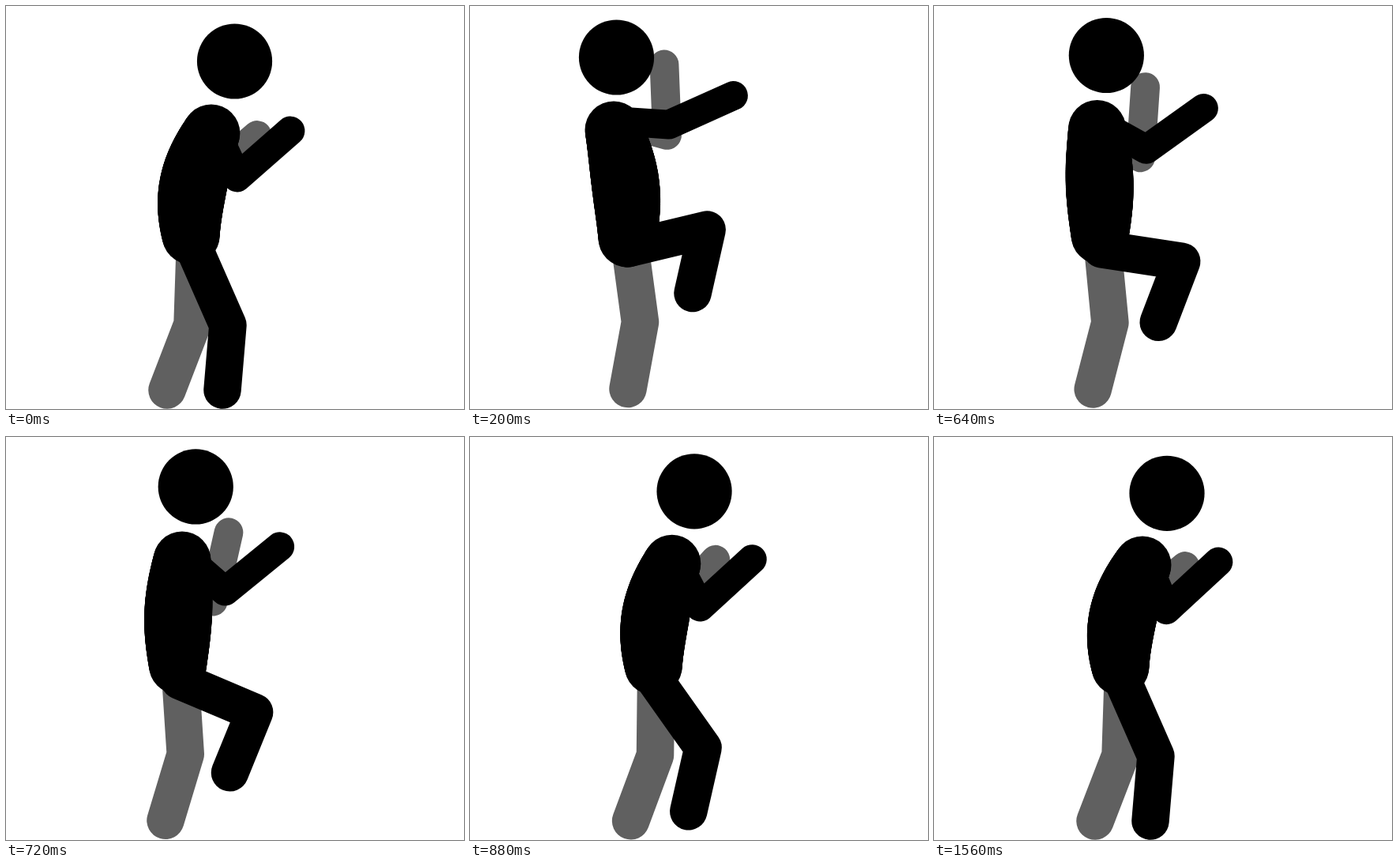
Recreate the animation shown at these times as an HTML page with a canvas. Size 580x510 px, loop 1.6 s.

```html
<!DOCTYPE html>
<html lang="en">
<head>
<meta charset="utf-8">
<title>Knee raise</title>
<style>
html, body { margin: 0; width: 100%; height: 100%; overflow: hidden; background: #fff; }
canvas { display: block; }
</style>
</head>
<body>
<canvas id="stage" width="580" height="510"></canvas>
<script>
const ctx = document.getElementById('stage').getContext('2d');
const LOOP = 1600, STEP = 40, RAISE = 200, LOWER_AT = 520, LOWER = 400;
const BLACK = '#000', GREY = '#606060';
const THIGH = 103, SHIN = 82.5, UPPER_ARM = 67, FOREARM = 89.5;
const LEG_WIDTH = 47.5, ARM_WIDTH = 36.8, HEAD_RADIUS = 47.6;

const mix = (a, b, q) => a + (b - a) * q;
const easeOut = (u, k) => u + k * u * (1 - u);

// Point on the way from a (rest) to b (raised); bow bends the path halfway.
function travel(a, b, q, bow = [0, 0]) {
  return a.map((v, i) => mix(v, b[i], q) + bow[i] * 4 * q * (1 - q));
}

// Middle joint of a two-bone limb; side picks the bending direction.
function joint([ax, ay], [bx, by], len1, len2, side) {
  const dx = bx - ax, dy = by - ay, d = Math.hypot(dx, dy);
  const cos = (len1 * len1 + d * d - len2 * len2) / (2 * len1 * d);
  const angle = Math.atan2(dx, dy) + side * Math.acos(Math.min(1, cos));
  return [ax + len1 * Math.sin(angle), ay + len1 * Math.cos(angle)];
}

function limb(points, width, color) {
  ctx.strokeStyle = color;
  ctx.lineWidth = width;
  ctx.beginPath();
  for (const [x, y] of points) ctx.lineTo(x, y);
  ctx.stroke();
}

function arm(shoulder, hand, color) {
  const elbow = joint(shoulder, hand, UPPER_ARM, FOREARM, -1);
  limb([shoulder, elbow, hand], ARM_WIDTH, color);
}

function disc([x, y], r) {
  ctx.beginPath();
  ctx.arc(x, y, r, 0, Math.PI * 2);
  ctx.fill();
}

// A curved spine, thickest in the middle; leaning bends the back.
function torso(pelvis, chest) {
  const lean = chest[0] - pelvis[0];
  for (let s = 0; s <= 1; s += 1 / 64) {
    const x = mix(pelvis[0], chest[0], s) - 1.5 * lean * s * (1 - s);
    disc([x, mix(pelvis[1], chest[1], s)], 36.5 + 6.5 * Math.sin(Math.PI * s));
  }
}

function draw(t) {
  const rising = t < LOWER_AT;
  const u = Math.min(t / RAISE, 1);
  const down = Math.max(0, 1 - (t - LOWER_AT) / LOWER);
  const body = rising ? mix(0.05, 1, easeOut(u, 0.22)) : down;
  const front = rising ? easeOut(u, 0.28) : down;
  const back = rising ? u : down;

  ctx.fillStyle = '#fff';
  ctx.fillRect(0, 0, 580, 510);
  ctx.lineCap = ctx.lineJoin = 'round';
  ctx.fillStyle = BLACK;

  const shoulder = travel([268.7, 156.8], [185, 145.5], body);

  limb([
    travel([239, 312], [204, 315], back),
    travel([236, 403], [215.5, 400], back, [1.5, 0]),
    travel([204, 486], [200, 484.5], back)
  ], LEG_WIDTH, GREY);
  arm(shoulder, travel([318, 163.5], [246, 74], back, [0, 2]), GREY);

  torso(travel([236, 291], [199, 294], body, [0, -3.5]),
        travel([264, 162], [182, 157], body, [0, -3.5]));

  const hip = travel([239.5, 309.5], [200, 307], front);
  const foot = travel([274, 486], [282, 363.5], front, [5.5, 0]);
  limb([hip, joint(hip, foot, THIGH, SHIN, 1), foot], LEG_WIDTH, BLACK);

  arm(shoulder, travel([360, 158], [333.5, 113.5], front, [0, 3]), BLACK);
  disc(travel([295, 71.3], [185.5, 65], body, [0, -5.2]), HEAD_RADIUS);
}

const start = performance.now();
function tick() {
  const t = (performance.now() - start) % LOOP;
  draw(Math.floor(t / STEP) * STEP);
  requestAnimationFrame(tick);
}
tick();
</script>
</body>
</html>
```
